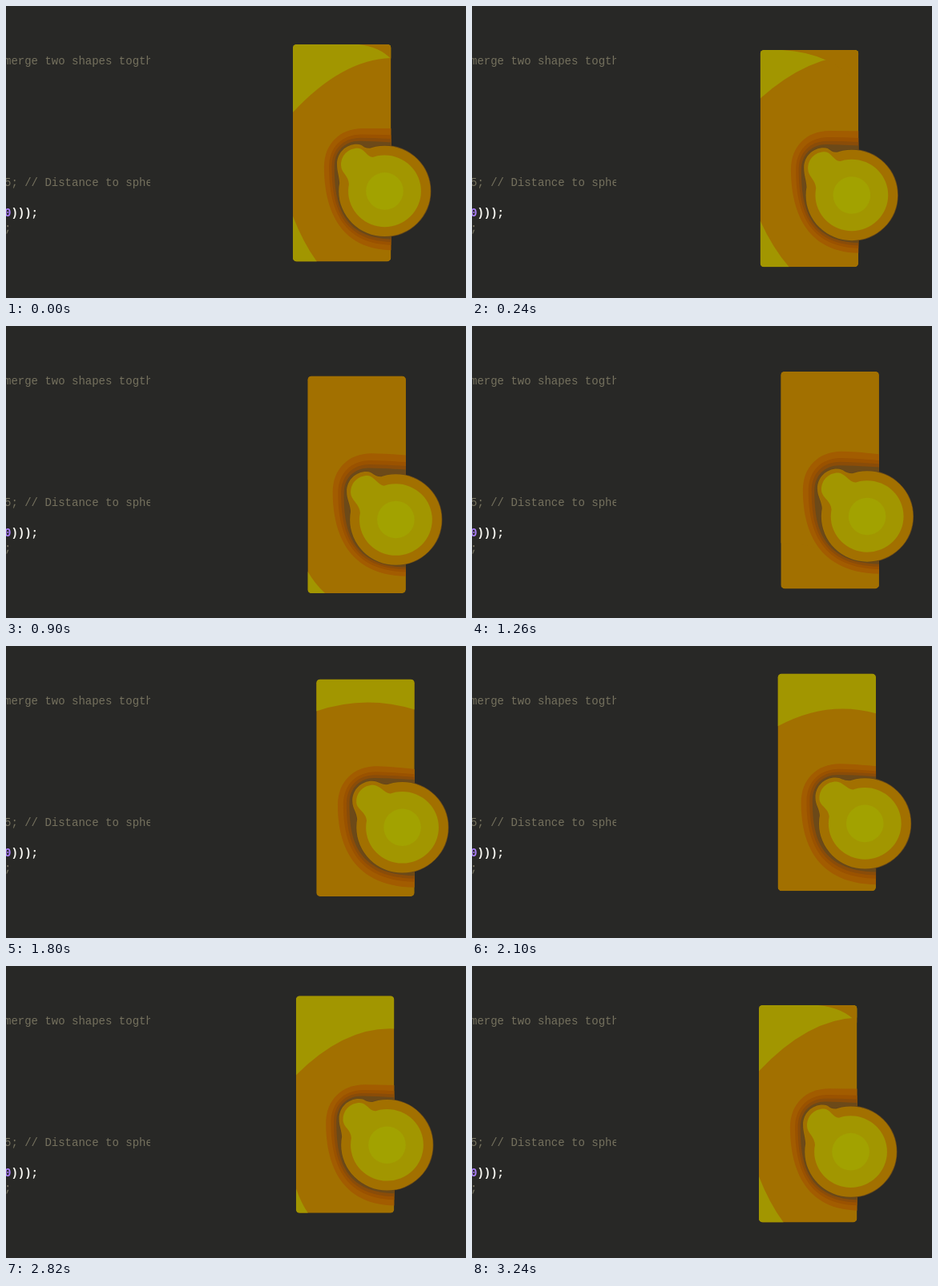
Animation of 574x365 px, one loop 3300 ms. Source, as an HTML page with a canvas:

```html
<!DOCTYPE html>
<html lang="en">
<head>
<meta charset="utf-8">
<title>Smooth union of two shapes</title>
<style>
  html, body { margin: 0; width: 100%; height: 100%; overflow: hidden; background: #282826; }
  #stage { position: relative; width: 574px; height: 365px; overflow: hidden; }
  canvas { position: absolute; left: 0; top: 0; }
  #code { position: absolute; left: 0; top: 0; width: 180px; height: 365px; overflow: hidden;
    font: 14px/19px "Liberation Mono", "Courier New", monospace; color: #75715e; white-space: pre; }
  #code div { position: absolute; left: -2px; }
  #code b { color: #f8f8f2; }
  #code b i { color: #ae81ff; font-style: normal; }
</style>
</head>
<body>
<div id="stage">
  <canvas id="view" width="574" height="365"></canvas>
  <div id="code">
    <div style="top:60px">merge two shapes togther</div>
    <div style="top:212px">5; // Distance to sphere</div>
    <div style="top:250px"><b><i>0</i>)));</b></div>
    <div style="top:269px">;</div>
  </div>
</div>
<script>
const LOOP = 3300, STEP = 60, TAU = Math.PI * 2;
const ORANGE = '#a27000', YELLOW = '#a29600', CORE = '#a2a200', EDGE = '#654619';
const BOX_W = 122.5, BOX_H = 271.4;
const ctx = document.getElementById('view').getContext('2d');

// Shapes of the lit zones on the box face, keyed by orbit phase.
const PHASES = [.02, 1.08, 2.49, 3.55, 4.72, 5.55];
const ZONE = {
  left:   [85, 25, -20, 40, 85, 99],
  bend:   [19, -10, -25, 19, 40, 38],
  right:  [17, -5, -20, 38, 52, 41],
  footH:  [57, 49, 3, -25, -10, 31],
  footW:  [30, 37, 2, -25, -10, 15]
};

// Shadow bands around the ball: how far from the halo to the outline, and colour.
const BANDS = [[0, '#a25c00'], [.38, '#9a5200'], [.6, '#8a4c08'], [.8, '#6c4918']];

const mix = (a, b, k) => a + (b - a) * k;

// Periodic Catmull-Rom through the phase keys.
function sample(values, phase) {
  const n = PHASES.length;
  const p = (phase - PHASES[0] + TAU) % TAU + PHASES[0];
  let i = n - 1;
  while (PHASES[i] > p) i--;
  const end = i + 1 < n ? PHASES[i + 1] : PHASES[0] + TAU;
  const u = (p - PHASES[i]) / (end - PHASES[i]);
  const [a, b, c, d] = [-1, 0, 1, 2].map(k => values[(i + k + n) % n]);
  return b + u / 2 * (c - a + u * (2 * a - 5 * b + 4 * c - d + u * (3 * (b - c) + d - a)));
}

function fill(path, color) {
  ctx.fillStyle = color;
  ctx.fill(path);
}

function boxPath() {
  const p = new Path2D();
  p.roundRect(0, 0, BOX_W, BOX_H, 4.5);
  return p;
}

function drawFace(phase) {
  const z = {};
  for (const key in ZONE) z[key] = sample(ZONE[key], phase);
  fill(boxPath(), ORANGE);

  const top = new Path2D();
  top.moveTo(0, -60);
  top.lineTo(0, z.left);
  top.quadraticCurveTo(BOX_W / 2, z.bend, BOX_W, z.right);
  top.lineTo(BOX_W, -60);
  fill(top, YELLOW);

  // Orange sweeps back over the top from the right.
  const turn = phase % TAU;
  const x = 82 - 120 * ((turn < 2.6 ? turn : turn - TAU) - .02);
  if (x < BOX_W) {
    const start = Math.max(x, 0), drop = Math.max(-x, 0);
    const cover = new Path2D();
    cover.moveTo(start, -1);
    cover.lineTo(start, drop);
    cover.quadraticCurveTo(mix(start, BOX_W, .65), drop + 3, BOX_W, drop + (BOX_W - start) * .45);
    cover.lineTo(BOX_W, -1);
    fill(cover, ORANGE);
  }

  if (z.footH > 0 && z.footW > 0) {
    const foot = new Path2D();
    foot.moveTo(0, BOX_H - z.footH);
    foot.quadraticCurveTo(z.footW * .42, BOX_H - z.footH * .42, z.footW, BOX_H);
    foot.lineTo(0, BOX_H);
    fill(foot, YELLOW);
  }
}

function bandPath(k, halo, rim, right, slant) {
  const l = mix(halo.l, rim.l, k), t = mix(halo.t, rim.t, k), b = mix(halo.b, rim.b, k);
  const knob = mix(48, 27, k), tilt = mix(slant, 2, k);
  const p = new Path2D();
  p.moveTo(right, t + tilt);
  p.quadraticCurveTo(l + knob + 15, t, l + knob, t);
  p.bezierCurveTo(l + knob * .42, t, l, t + knob * .4, l, t + knob);
  p.bezierCurveTo(l, t + knob + 38, l + mix(10, 2, k), b - 1, right, b);
  return p;
}

// Ball joined with the box corner that pokes through it.
function ballPath(ball, rim, rx, ry, pad) {
  const { x, y } = ball, l = rim.l + pad, t = rim.t + pad, r = 25 - pad * .8;
  const p = new Path2D();
  p.ellipse(x, y, rx, ry, 0, 0, TAU, true);
  p.moveTo(x - rx * .32, y - ry * .947);
  p.bezierCurveTo(x - rx * .48, y - ry * .94, l + r + 8, t, l + r, t);
  p.bezierCurveTo(l + r * .43, t, l, t + r * .43, l, t + r);
  p.bezierCurveTo(l, t + r + 10, x - rx * .99, y - 20, x - rx * .98, y - 8);
  p.lineTo(x, y);
  p.closePath();
  return p;
}

function draw(time) {
  const phase = .02 + time * .00196;
  const c = Math.cos(phase), s = Math.sin(phase);
  const box = { x: 373.2 - 15.3 * c, y: 47.7 + 15.3 * s };
  const ball = { x: 484 - 11.5 * c, y: 231.2 + 11.1 * s };
  const halo = { l: 405.8 - 8.9 * c, t: 152.8 + 6.6 * s, b: 305 + 8 * s };
  const rim = { l: 423 - 10 * c, t: 172.6 + 9.7 * s, b: ball.y + 56.7 };

  ctx.clearRect(0, 0, 574, 365);
  ctx.save();
  ctx.translate(box.x, box.y);
  ctx.clip(boxPath());
  drawFace(phase);
  ctx.translate(-box.x, -box.y);
  for (const [k, color] of BANDS) {
    fill(bandPath(k, halo, rim, box.x + BOX_W + 1, 2 - 2 * c), color);
  }
  ctx.restore();

  const outer = ballPath(ball, rim, 57.3, 56.7, 0);
  ctx.strokeStyle = EDGE;
  ctx.lineWidth = 1.3;
  ctx.stroke(outer);
  fill(outer, ORANGE);
  fill(ballPath(ball, rim, 45.4, 44.8, 5), YELLOW);
  const core = new Path2D();
  core.arc(ball.x, ball.y, 23.3, 0, TAU);
  fill(core, CORE);
}

const begin = performance.now();
function tick() {
  const time = (performance.now() - begin) % LOOP;
  draw(Math.floor(time / STEP) * STEP);
  requestAnimationFrame(tick);
}
tick();
</script>
</body>
</html>
```
